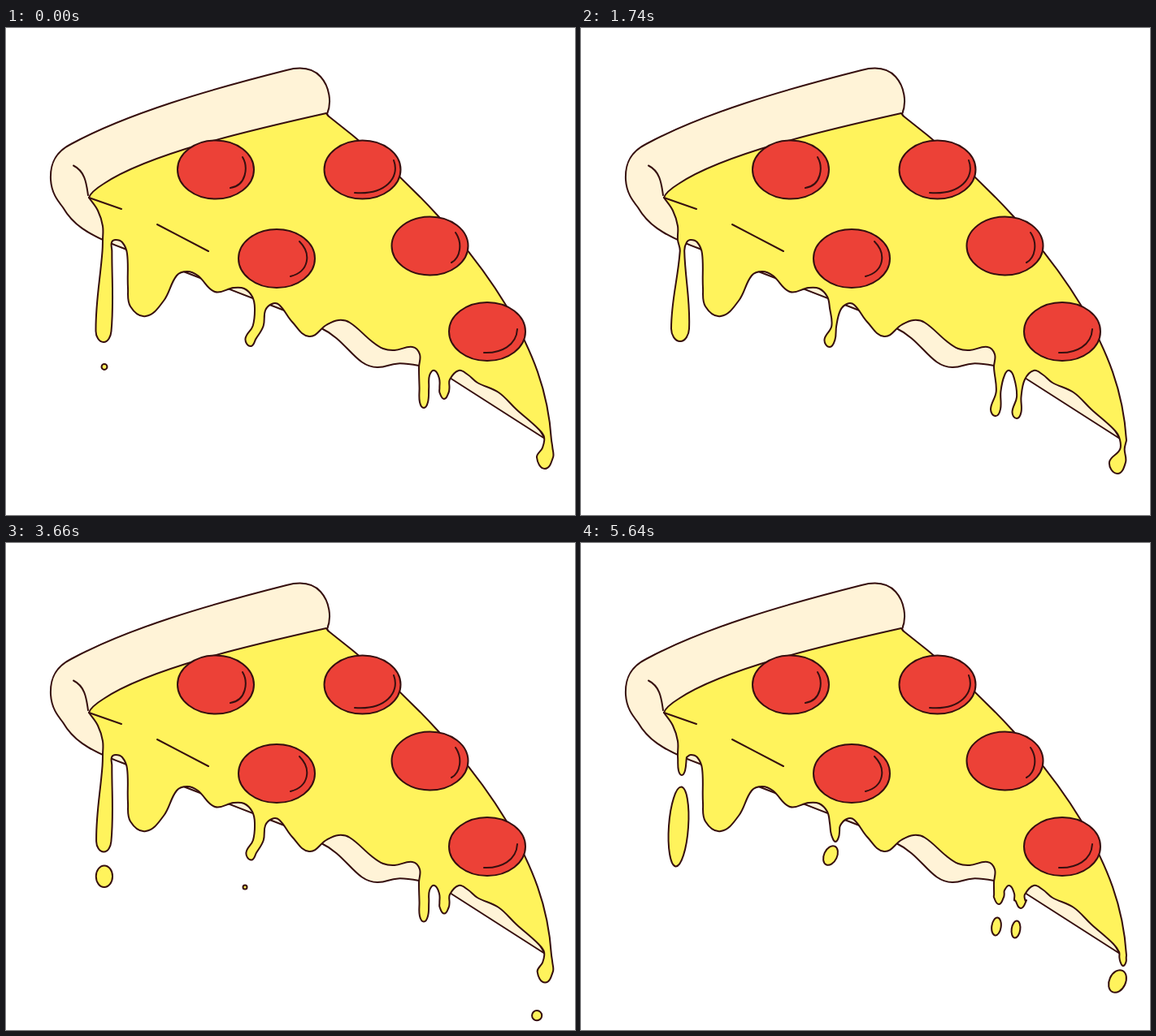
Write an HTML page that moves like this. It is 700 px wide and 600 px high and loops after 5700 ms.

```html
<!DOCTYPE html>
<html lang="en">
<head>
<meta charset="utf-8">
<title>Dripping pizza</title>
<style>
  html, body { margin: 0; width: 100%; height: 100%; overflow: hidden; background: #fff; }
  svg { display: block; width: 700px; height: 600px; }
  .ink { stroke: #360f0f; stroke-width: 2; stroke-linecap: round; stroke-linejoin: round; fill: none; }
  #crust { fill: #fff3d7; }
  #cheese, #drops { fill: #fff35c; }
  #toppings ellipse { fill: #ec4137; }
</style>
</head>
<body>
<svg viewBox="0 0 700 600">
  <g class="ink">
    <path id="crust" d="M395 106C401 92 398 72 387 60C376 48 360 48 345 52C250 76 150 105 80 143C60 153 54 168 55 187C56 203 63 212 70 221C81 240 97 254 146 272L345 349L388 370C420 385 430 418 457 418C475 418 470 409 508 416L527 420L546 431L663 506L600 400Z"/>
    <path d="M83 169.500C98 177 99 193 101 206"/>
    <path id="cheese"/>
    <path d="M102 209L142 223M186 242L249 275"/>
    <g id="toppings">
      <ellipse cx="258" cy="174.500" rx="47" ry="36"/>
      <ellipse cx="438.500" cy="174.500" rx="47" ry="36"/>
      <ellipse cx="333" cy="284" rx="47" ry="36"/>
      <ellipse cx="521.500" cy="268.500" rx="47" ry="36"/>
      <ellipse cx="592" cy="374" rx="47" ry="36"/>
      <path d="M291 159C298 171 296 194 276 197M477 163C485 184 467 206 429 203M361 263C376 278 373 300 350 306M553 252C562 265 559 283 548 289M629 371C628 391 609 401 588 400"/>
    </g>
    <g id="drops"></g>
  </g>
</svg>
<script>
const STEP = 60, LOOP = 5700, CYCLE = 9, BREAK = 4;

// Melted edge between the drips, left to right
const banks = [
  [[102,209], [113,225], [119,244]],
  [[135,261], [143,264], [149,278], [150,320], [153,343], [172,355], [194,336], [210,305],
   [223,300], [236,305], [257,325], [280,320], [293,321], [303,331]],
  [[327,340], [336,341], [352,362], [373,380], [394,366], [409,360], [423,363], [450,386],
   [464,395], [478,397], [500,393], [509,402]],
  [[527,422]],
  [[557,422], [568,427], [580,437], [606,449], [628,470], [655,494]]
];

// Roots of each drip, where its waist sits, and its end (x, y, half width)
// just after breaking, when regrown and when stretched
const drips = [
  { left: [119,261], right: [130,264], waist: .1, stub: [124,286,4], full: [120,387,9.5], long: [122,386,11] },
  { left: [306,345], right: [319,348], waist: .45, stub: [313,368,4], full: [301,392,6.5], long: [306,393,6.5] },
  { left: [508,418], right: [521,428], waist: .45, stub: [514,445,6], full: [514,468,5], long: [510,478,6] },
  { left: [533,432], right: [546,433], waist: .45, stub: [541,450,7], full: [539,457,5.5], long: [536,481,5.5] },
  { left: [662,504], right: [671,508], waist: .3, stub: [667,521,3.5], full: [663,543,10], long: [660,549,10] }
];

// Right side and the seam under the crust, back to the first bank
const back = "C667 446 648 400 616 343C575 275 505 192 396 108L394 105" +
  "C300 126 175 155 120 192C112 197 104 203 102 209Z";

// Falling drops; life is counted in steps
const drops = [
  { x: 120, y: 349.5, rx: 12, ry: 49, tilt: 4, dx: 1, dy: 68, life: 5.6 },
  { x: 307, y: 385, rx: 8, ry: 12.5, tilt: 25, dx: -13, dy: 39, life: 3.4 },
  { x: 511, y: 472.5, rx: 5.7, ry: 11, tilt: 8, dx: -5, dy: 28, life: 3 },
  { x: 535, y: 476, rx: 5.3, ry: 10.5, tilt: 8, dx: -5, dy: 28, life: 3 },
  { x: 660, y: 540, rx: 10, ry: 14.5, tilt: 25, dx: -7, dy: 43, life: 4.1 }
];

const byId = id => document.getElementById(id);
const mix = (a, b, k) => a + (b - a) * k;
const lerp = (a, b, k) => a.map((v, i) => mix(v, b[i], k));
const easeOut = u => 1 - (1 - u) ** 3;

// Smooth curve through points; handles scale with each span.
function spline(p) {
  const tangent = i => {
    const a = p[Math.max(i - 1, 0)], b = p[Math.min(i + 1, p.length - 1)];
    const dx = b[0] - a[0], dy = b[1] - a[1], n = Math.hypot(dx, dy) || 1;
    return [dx / n, dy / n];
  };
  let d = "M" + p[0];
  for (let i = 1; i < p.length; i++) {
    const a = p[i - 1], b = p[i], u = tangent(i - 1), v = tangent(i);
    const h = Math.hypot(b[0] - a[0], b[1] - a[1]) * .36;
    const curve = [a[0] + u[0] * h, a[1] + u[1] * h, b[0] - v[0] * h, b[1] - v[1] * h, ...b];
    d += "C" + curve.map(n => n.toFixed(2));
  }
  return d;
}

// A drip grows back after breaking, then stretches while its waist narrows.
function dripPoints({ left, right, waist, stub, full, long }, step) {
  const pinch = step < BREAK ? Math.min(step / 2, 1.2) : 0;
  const [x, y, w] = step < BREAK
    ? lerp(full, long, pinch)
    : lerp(stub, full, easeOut((step - BREAK) / (CYCLE - BREAK)));
  const root = lerp(left, right, .5);
  const cx = mix(root[0], x, waist * waist), cy = mix(root[1], y, waist);
  const half = mix((right[0] - left[0]) / 2, w, waist) * (1 - .55 * pinch);
  const bulb = y - 1.4 * w;
  return [left, [cx - half, cy], [x - w, bulb], [x, y], [x + w, bulb], [cx + half, cy], right];
}

const blobs = drops.map(() => {
  const e = document.createElementNS("http://www.w3.org/2000/svg", "ellipse");
  return byId("drops").appendChild(e);
});

// A drop slows as it falls, rounds off and shrinks away.
function placeDrop(blob, { x, y, rx, ry, tilt, dx, dy, life }, step) {
  const u = ((step + CYCLE - BREAK) % CYCLE || (step === BREAK ? 0 : CYCLE)) / life;
  const shown = u < 1;
  blob.style.display = shown ? "" : "none";
  if (!shown) return;
  const fall = easeOut(u), r = rx * (1 - u ** 3);
  blob.setAttribute("rx", r);
  blob.setAttribute("ry", r * mix(ry / rx, 1, fall));
  blob.setAttribute("transform", `translate(${x + dx * fall} ${y + dy * fall}) rotate(${tilt * (1 - fall)})`);
}

function draw(step) {
  const edge = banks.flatMap((bank, i) => [...bank, ...dripPoints(drips[i], step)]);
  byId("cheese").setAttribute("d", spline(edge) + back);
  blobs.forEach((blob, i) => placeDrop(blob, drops[i], step));
}

const began = performance.now();
let last = -1;
function tick() {
  const step = Math.floor(((performance.now() - began) % LOOP) / STEP) % CYCLE;
  if (step !== last) draw(last = step);
  requestAnimationFrame(tick);
}
tick();
</script>
</body>
</html>
```
